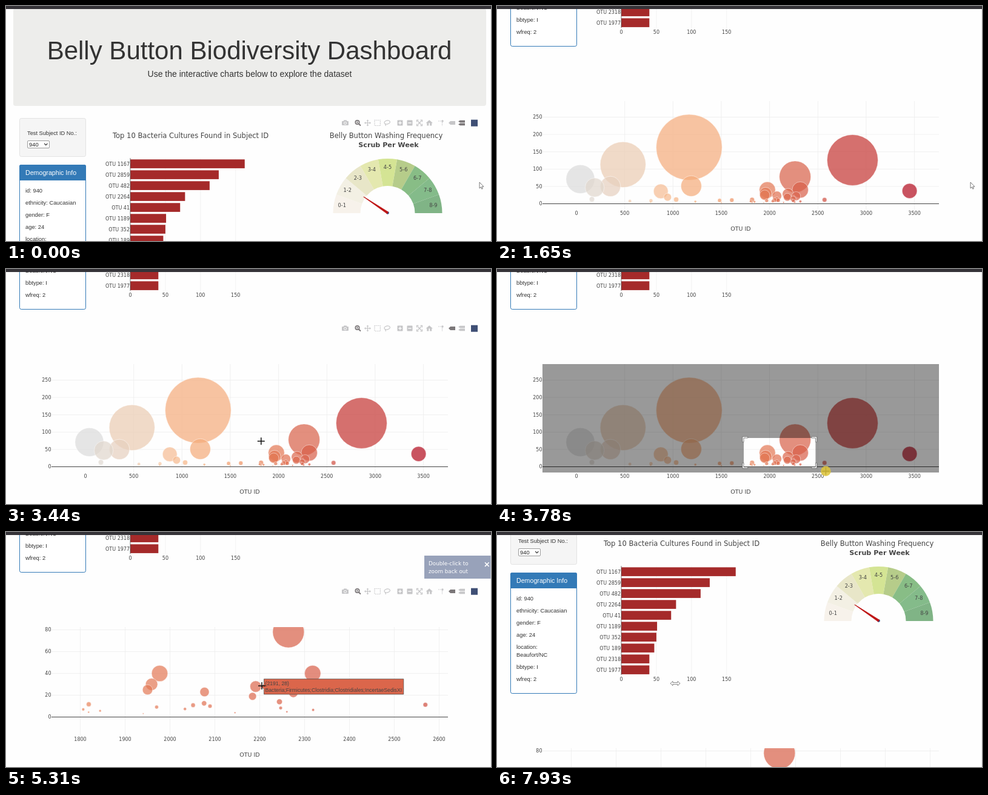
Write an HTML page with a canvas that moves like this. It is 800 px wide and 388 px high and loops after 8 s.

```html
<!DOCTYPE html>
<html lang="en">
<head>
<meta charset="utf-8">
<title>Belly Button Biodiversity Dashboard</title>
<style>
html, body { margin: 0; width: 100%; height: 100%; overflow: hidden; background: #fefefe; }
canvas { display: block; width: 800px; height: 388px; }
</style>
</head>
<body>
<canvas id="stage"></canvas>
<script>
const W = 800, H = 388, LOOP = 8000, TAU = Math.PI * 2;
const SANS = '"Liberation Sans", Arial, sans-serif';
const WIDE = '"DejaVu Sans", Verdana, sans-serif';
const canvas = document.getElementById('stage');
const c = canvas.getContext('2d');
const dpr = window.devicePixelRatio || 1;
canvas.width = W * dpr;
canvas.height = H * dpr;

// Page geometry is unscrolled; the page ends 395 px further down.
const NOTCH = 200 / 3, END = 395;
const WHEEL_DOWN = [400, 660, 860, 990, 1120, 1650];
const WHEEL_UP = [7040, 7240, 7440];
const PLOT = { l: 75, r: 729, t: 552, b: 731 };
const DRAG = { x: 407, y: 279, start: 3500, end: 4120 };

// Pointer moves: start, end, x, y
const MOVES = [
  [2070, 2140, 706, 312],
  [2720, 2970, 560, 338],
  [3290, 3490, DRAG.x, DRAG.y],
  [DRAG.start, 3850, 548, 336],
  [4120, 4900, 422, 254],
  [6290, 6640, 404, 231],
  [7790, 7910, 294, 250],
];

const BARS = [[1167, 163], [2859, 126], [482, 113], [2264, 78], [41, 71],
  [1189, 51], [352, 50], [189, 47], [2318, 40], [1977, 40]];
const MEDIUM = [[3450, 37], [874, 36], [1959, 30], [2191, 28], [1950, 25],
  [2077, 23], [2275, 22], [944, 19], [2184, 19], [2244, 14]];
const BUBBLES = [...BARS, ...MEDIUM, ...smallBubbles(24)];

const GAUGE = ['#f7f2eb', '#f3f0e4', '#e8e6c8', '#e4e8af', '#d4e494', '#b6cc8a',
  '#88bd86', '#84bb8a', '#80b486'];

const clamp = v => Math.max(0, Math.min(1, v));
const mix = (a, b, f) => a + (b - a) * f;
const during = (t, a, b) => t >= a && t < b;
const passed = (times, t) => times.filter(v => v <= t).length;

function smallBubbles(n) {
  let seed = 11;
  const rnd = () => (seed = seed * 16807 % 2147483647) / 2147483647;
  return Array.from({ length: n }, (_, i) =>
    [i % 2 ? 1790 + rnd() * 640 : 160 + rnd() * 2800, 13 - i * 0.43]);
}

function scrollAt(t) {
  return Math.min(END, passed(WHEEL_DOWN, t) * NOTCH) - passed(WHEEL_UP, t) * NOTCH;
}

// The pointer is sampled every 70 ms and slows down towards each stop.
function pointerAt(t) {
  const now = Math.floor(t / 70) * 70;
  let x = 781, y = 291;
  for (const [a, b, toX, toY] of MOVES) {
    const f = 1 - (1 - clamp((now - a) / (b - a))) ** 2;
    x = mix(x, toX, f);
    y = mix(y, toY, f);
  }
  return [x, y];
}

// Grey, peach, orange, dark red
function reds(id) {
  const t = (id - 41) / 3409;
  const [a, b, f] = t < 0.2 ? [[220, 220, 220], [245, 195, 157], t / 0.2]
    : t < 0.4 ? [[245, 195, 157], [245, 160, 105], (t - 0.2) / 0.2]
    : [[245, 160, 105], [178, 10, 28], (t - 0.4) / 0.6];
  return `rgb(${a.map((v, i) => Math.round(mix(v, b[i], f)))})`;
}

// y is the middle of the capital letters
function text(s, x, y, size, { font = SANS, align = 'left', color = '#333', bold = false } = {}) {
  c.font = `${bold ? 'bold ' : ''}${size}px ${font}`;
  c.textAlign = align;
  c.fillStyle = color;
  c.fillText(s, x, y + size * 0.36);
}

function chartText(s, x, y, align = 'center', size = 8, bold = false) {
  text(s, x, y, size, { font: WIDE, align, bold, color: '#444' });
}

function paint(fill, stroke, width = 0.7) {
  if (fill) { c.fillStyle = fill; c.fill(); }
  if (stroke) { c.strokeStyle = stroke; c.lineWidth = width; c.stroke(); }
}

function rect(x, y, w, h, fill) {
  c.fillStyle = fill;
  c.fillRect(x, y, w, h);
}

function round(x, y, w, h, r, fill, stroke, width) {
  c.beginPath();
  c.roundRect(x, y, w, h, r);
  paint(fill, stroke, width);
}

function disc(x, y, r, fill, stroke, width) {
  c.beginPath();
  c.arc(x, y, r, 0, TAU);
  paint(fill, stroke, width);
}

function poly(p, fill, stroke, width, close = true) {
  c.beginPath();
  for (let i = 0; i < p.length; i += 2) c.lineTo(p[i], p[i + 1]);
  if (close) c.closePath();
  paint(fill, stroke, width);
}

function line(x1, y1, x2, y2, color, width) {
  poly([x1, y1, x2, y2], null, color, width, false);
}

function header() {
  round(12, 4, 780, 161, 4, '#ededeb');
  text('Belly Button Biodiversity Dashboard', 401.5, 73, 42, { align: 'center' });
  text('Use the interactive charts below to explore the dataset', 402, 112, 14, { align: 'center' });
}

function sidebar() {
  round(22.5, 185.5, 109, 63, 2.7, '#f5f5f5', '#e3e3e3', 1);
  text('Test Subject ID No.:', 35, 210, 9.25);
  round(35.5, 222.5, 36, 12, 1.5, '#fff', '#767676');
  text('940', 38, 228.3, 9.33, { color: '#222' });
  poly([63.2, 227, 65.8, 229.6, 68.4, 227], null, '#333', 1.1, false);

  round(22.5, 262.5, 109, 199, 2.7, '#fff', '#337ab7', 1);
  round(22, 262, 110, 26, [2.7, 2.7, 0, 0], '#337ab7');
  text('Demographic Info', 32, 275, 10.67, { color: '#fff' });
  const rows = ['id: 940', 'ethnicity: Caucasian', 'gender: F', 'age: 24', 'location:',
    'Beaufort/NC', 'bbtype: I', 'wfreq: 2'];
  rows.forEach((s, i) => text(s, 32, 304.3 + i * 20 - (i > 4 ? 6.7 : 0), 9.33));
}

function barChart() {
  const X = v => 205 + v * 1.158;
  chartText('Top 10 Bacteria Cultures Found in Subject ID', 304.5, 214, 'center', 11.55);
  for (let v = 0; v <= 150; v += 50) {
    if (v) line(X(v), 251, X(v), 431, '#eee');
    chartText(v, X(v), 438);
  }
  BARS.forEach(([id, v], i) => {
    const y = 260.6 + i * 18;
    rect(205, y - 7.3, X(v) - 205, 14.6, '#a52a2a');
    chartText('OTU ' + id, 204, y + 0.1, 'right');
  });
  line(205, 251, 205, 431, '#444');
}

function gauge() {
  const x = 629.5, y = 342, step = Math.PI / 9;
  chartText('Belly Button Washing Frequency', 627, 214, 'center', 11.55);
  chartText('Scrub Per Week', 631, 229, 'center', 11.15, true);
  GAUGE.forEach((color, i) => {
    const a = Math.PI + i * step, mid = a + step / 2;
    c.beginPath();
    c.arc(x, y, 90, a, a + step);
    c.arc(x, y, 45, a + step, a, true);
    c.closePath();
    paint(color);
    chartText(`${i}-${i + 1}`, x + 76.5 * Math.cos(mid), y + 76.5 * Math.sin(mid) + 0.2, 'center', 8.2);
  });
  disc(x, y - 0.5, 2.3, '#2b4a86');
  poly([588.7, 314.8, 591, 315, 631, 340, 628.8, 343.6], '#bf1616');
}

// Toolbar icons, centred on row y
function modebar(y, closest) {
  const off = '#c6c6c8', on = '#7b7779';
  const zoomBox = (x, plus) => {
    round(x - 4.5, y - 4.5, 9, 9, 1, off);
    rect(x - 2.7, y - 0.7, 5.4, 1.4, '#fff');
    if (plus) rect(x - 0.7, y - 2.7, 1.4, 5.4, '#fff');
  };
  const tag = (x, ty, h, color) =>
    poly([x - 5.5, ty, x - 2.5, ty - h, x + 5.5, ty - h, x + 5.5, ty + h, x - 2.5, ty + h], color);
  const turns = (x, shape) => {
    for (let i = 0; i < 4; i++) {
      c.save();
      c.translate(x, y);
      c.rotate(i * TAU / 4);
      shape();
      c.restore();
    }
  };
  // camera, magnifier
  round(554, y - 3, 11, 7, 1, off);
  rect(557, y - 4.5, 5, 2, off);
  disc(559.5, y + 0.4, 2, off, '#fff', 1);
  disc(579.5, y - 1, 3.2, null, on, 1.7);
  line(582, y + 1.5, 585, y + 4.6, on, 2);
  rect(578, y - 1.5, 3, 1, on);
  rect(579, y - 2.5, 1, 3, on);
  // pan, box select, lasso
  turns(596.5, () => {
    line(0, 0, 4.5, 0, off, 1.2);
    poly([5.6, 0, 3.2, -2, 3.2, 2], off);
  });
  c.setLineDash([1.6, 1.2]);
  c.strokeStyle = off;
  c.lineWidth = 1.2;
  c.strokeRect(608, y - 4.5, 9.4, 9);
  poly([713, y - 3, 719.5, y - 3, 719.5, y + 5], null, off, 1.2, false);
  c.setLineDash([]);
  disc(720, y - 3, 1.7, off);
  c.beginPath();
  c.ellipse(628.7, y - 1, 4.8, 3, -0.2, 0, TAU);
  paint(null, off, 1.2);
  line(625.4, y + 1.5, 626.6, y + 5, off, 1.2);
  // zoom in, zoom out, autoscale, home
  zoomBox(650, true);
  zoomBox(666, false);
  turns(682, () => {
    line(0, 0, 3.5, 3.5, off, 1.2);
    poly([1.6, 4.6, 4.6, 4.6, 4.6, 1.6], null, off, 1.1, false);
  });
  poly([692.5, y + 0.3, 698.2, y - 4.8, 704, y + 0.3], off);
  rect(694.3, y, 3, 4.5, off);
  rect(699.2, y, 3, 4.5, off);
  // hover modes, logo
  tag(735.5, y, 3, closest ? on : off);
  for (const dy of [-2.4, 2.4]) tag(751.5, y + dy, 1.9, closest ? off : on);
  rect(767, y - 5.3, 11, 11, '#3f4f75');
}

// Zoom box; it trails the pointer by one step
function selection(t) {
  const { x: l, y } = DRAG, top = y + END;
  const [px, py] = pointerAt(t - 70);
  const w = px - l, h = py - y;
  if (w < 7) return;
  c.beginPath();
  c.rect(PLOT.l, PLOT.t, PLOT.r - PLOT.l, PLOT.b - PLOT.t);
  c.rect(l, top, w, h);
  c.fillStyle = `rgba(0,0,0,${0.4 * clamp((t - DRAG.start - 30) / 200)})`;
  c.fill('evenodd');
  const n = Math.min(6.7, h / 2);
  for (const sx of [1, -1]) for (const sy of [1, -1]) {
    c.save();
    c.translate(sx > 0 ? l : l + w, sy > 0 ? top : top + h);
    c.scale(sx, sy);
    poly([-2.2, n, 0, n, 0, 0, n, 0, n, -2.2, -2.2, -2.2], '#fff', '#555');
    c.restore();
  }
}

function bubbleChart(t) {
  const view = t >= DRAG.end
    ? { x: -1209.5, kx: 0.74, from: 1800, to: 2600, dx: 100, y: 700.5, ky: 1.8, max: 80, dy: 20 }
    : { x: 131, kx: 0.1593, from: 0, to: 3500, dx: 500, y: 721.5, ky: 0.572, max: 250, dy: 50 };
  const X = id => view.x + id * view.kx;
  const Y = v => view.y - v * view.ky;
  const { l, r, t: top, b } = PLOT;
  for (let v = view.from; v <= view.to; v += view.dx) {
    if (v) line(X(v), top, X(v), b, '#ebebeb');
    chartText(v, X(v), 737.5);
  }
  for (let v = 0; v <= view.max; v += view.dy) {
    line(l, Y(v), r, Y(v), v ? '#ebebeb' : '#444', v ? 0.7 : 1);
    chartText(v, 74.5, Y(v), 'right');
  }
  chartText('OTU ID', 402, 762.5, 'center', 9.5);
  c.save();
  c.beginPath();
  c.rect(l, top, r - l, b - top);
  c.clip();
  c.globalAlpha = 0.7;
  for (const [id, v] of BUBBLES) disc(X(id), Y(v), v / 3, reds(id), '#fff');
  c.restore();
  if (during(t, DRAG.start, DRAG.end)) selection(t);
}

// Label with its tip at x, y; side is the direction it extends to
function hoverLabel(x, y, side, width, id, v, name, color) {
  const near = x + side * 4, far = near + side * width, top = y - 12.6, bottom = y + 12.6;
  poly([x, y, near, y - 4, near, top, far, top, far, bottom, near, bottom, near, y + 4],
    reds(id), color);
  const style = { align: side < 0 ? 'right' : 'left', color };
  text(`(${id}, ${v})`, near + side * 2, y - 5, 8.67, style);
  text(name, near + side * 2, y + 6, 8.67, style);
}

function hoverLabels(t) {
  if (during(t, 2150, 2760)) {
    hoverLabel(668, 305.8, -1, 402.5, 3450, 37,
      'Bacteria;Proteobacteria;Epsilonproteobacteria;Campylobacterales;Campylobacteraceae;Campylobacter',
      '#fff');
  }
  if (during(t, 4960, 6370)) {
    c.globalAlpha = clamp((t - 4900) / 200);
    hoverLabel(421.5, 255.3, 1, 230.3, 2191, 28,
      'Bacteria;Firmicutes;Clostridia;Clostridiales;IncertaeSedisXI', '#444');
    c.globalAlpha = 1;
  }
}

function notice(t) {
  c.globalAlpha = Math.min(clamp((t - DRAG.end) / 350), clamp((7620 - t) / 300));
  const white = { font: WIDE, color: '#fff' };
  rect(690, 39, 110, 38, '#98a2ba');
  text('Double-click to', 697, 52.3, 8.8, white);
  text('zoom back out', 697, 65, 8.8, white);
  line(790, 50.3, 796.6, 56.9, '#fff', 1.6);
  line(796.6, 50.3, 790, 56.9, '#fff', 1.6);
  c.globalAlpha = 1;
}

function pointer(t) {
  c.save();
  c.translate(...pointerAt(t));
  if (t >= 7910) {
    poly([-8, 0, -4, -3.6, -4, -1.4, 4, -1.4, 4, -3.6, 8, 0, 4, 3.6, 4, 1.4, -4, 1.4, -4, 3.6],
      '#fff', '#555');
  } else if (during(t, 2070, 7240)) {
    line(-6, 0, 6, 0, '#111', 1.5);
    line(0, -6, 0, 6, '#111', 1.5);
    if (during(t, DRAG.start, 4060)) disc(0, 0, 8.3, 'rgba(222,196,56,.85)');
  } else {
    poly([0, 0, 0, 10, 2.3, 7.9, 3.8, 11.2, 5.3, 10.5, 3.9, 7.3, 6.9, 7.2], '#fff', '#444');
  }
  c.restore();
}

function draw(t) {
  c.setTransform(dpr, 0, 0, dpr, 0, 0);
  rect(0, 0, W, H, '#fefefe');
  c.save();
  c.translate(0, -scrollAt(t));
  header();
  sidebar();
  barChart();
  gauge();
  bubbleChart(t);
  if (t < 860) modebar(193, false);
  if (during(t, 2070, DRAG.start) || during(t, DRAG.end, 7440)) modebar(493, true);
  c.restore();
  hoverLabels(t);
  notice(t);
  line(799.6, 5, 799.6, H, '#e4e4e4');
  pointer(t);
  rect(0, 0, W, 5, '#353338');
}

const start = performance.now();
function tick() {
  draw((performance.now() - start) % LOOP);
  requestAnimationFrame(tick);
}
tick();
</script>
</body>
</html>
```
